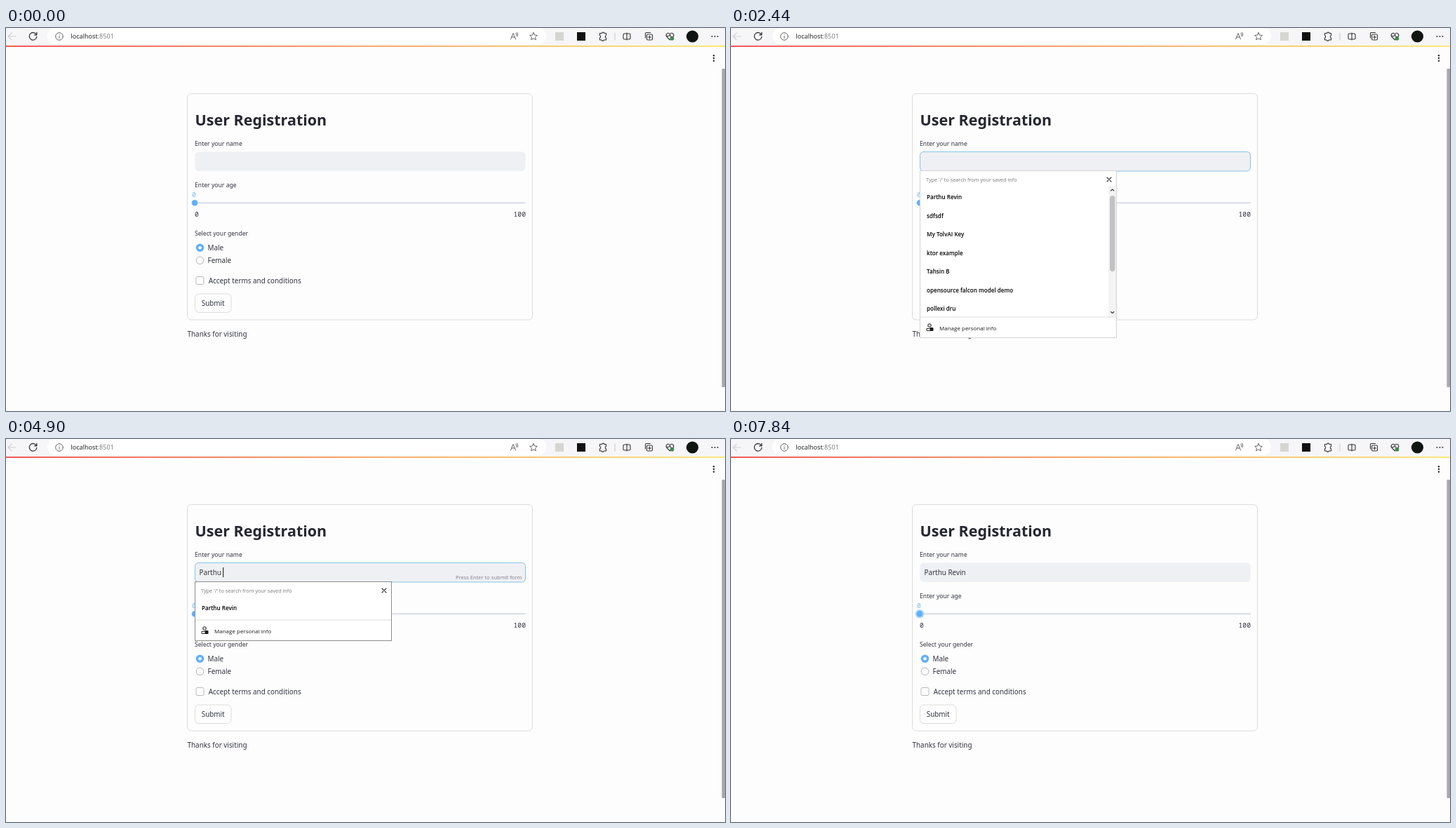
Animation, 1025 px wide and 546 px high, one loop 8 s. Source, as an HTML page:

```html
<!DOCTYPE html>
<html lang="en">
<head>
<meta charset="utf-8">
<title>User Registration</title>
<style>
  html, body { margin: 0; width: 100%; height: 100%; overflow: hidden; background: #fdfdfd; }
  svg { display: block; width: 1025px; height: 546px; }
  text { font: 9.9px "Noto Sans", sans-serif; fill: #31333f; }
  .title { font-size: 21.5px; font-weight: 600; fill: #262730; }
  .label { font-size: 8.65px; }
  .mono { font: 9.7px "Noto Sans Mono", monospace; }
  .hint { font-size: 7.5px; fill: #85868d; }
  .ui { font: 8px "Open Sans", sans-serif; fill: #1b1b1b; }
  .row { font-size: 8.1px; font-weight: 600; fill: #000; }
  .line { fill: none; stroke: #333; stroke-width: 1.1; stroke-linecap: round; stroke-linejoin: round; }
  .edge { fill: #fdfdfd; stroke: #dcdcda; }
</style>
</head>
<body>
<svg viewBox="0 0 1025 546">
  <defs>
    <linearGradient id="stripe">
      <stop offset="0" stop-color="#f4575a"/>
      <stop offset=".5" stop-color="#fba968"/>
      <stop offset="1" stop-color="#fbe97c"/>
    </linearGradient>
  </defs>
  <rect width="1025" height="546" fill="#fdfdfd"/>

  <!-- Browser bar -->
  <rect width="1025" height="25" fill="#f6f6f8"/>
  <rect x="59" y="0" width="711" height="23" rx="11.5" fill="#fff"/>
  <rect y="25" width="1025" height="2" fill="url(#stripe)"/>
  <g class="line">
    <path d="M14 12H3M8 7L3 12L8 17" stroke="#cfcfd2"/>
    <path d="M43.300 9.500A5.300 5.300 0 1 0 43.800 12.500M43.800 6.500V9.800H40.500" stroke-width="1.3"/>
    <g stroke="#666" stroke-width="1"><circle cx="76" cy="12" r="5.300"/><path d="M76 11.500V14.500M76 9.300V9.400"/></g>
    <g stroke="#666" stroke-width="1">
      <path d="M719.500 16L723 7.500L726.500 16M720.800 13H725.200M727 7.500Q728.500 9 727.500 11M728.500 6Q731 9 729 12"/>
      <path d="M752 6.500L753.600 10L757.400 10.400L754.600 13L755.400 16.800L752 14.900L748.600 16.800L749.400 13L746.600 10.400L750.400 10Z"/>
    </g>
    <path d="M846.500 7.500H849.500A1.800 1.800 0 0 1 853 7.500H855.500V10.500A1.900 1.900 0 0 0 855.500 14V17H852.500A1.800 1.800 0 0 1 849 17H846.500V14A1.900 1.900 0 0 0 846.500 10.500Z"/>
    <path d="M868 7V17" stroke="#ccc"/>
    <rect x="880" y="8" width="10" height="8" rx="1.500"/><path d="M885 7V17"/>
    <rect x="913.500" y="9" width="8" height="8" rx="1.500"/><path d="M911.500 14V8Q911.500 6.500 913 6.500H918.500M917.500 11V15M915.500 13H919.500"/>
    <path d="M946.500 17L942 12.500C939.500 9.500 943.500 5 946.500 8.500C949.500 5 953.500 9.500 951 12.500ZM942 11.500H945L946.500 9.500L948 12.500H950"/>
  </g>
  <rect x="783" y="6" width="12" height="12" fill="#d5d5d2"/>
  <rect x="814" y="6" width="12" height="12" fill="#111"/>
  <circle cx="949.500" cy="15" r="2.800" fill="#3d8a4d"/>
  <circle cx="978.500" cy="12" r="8.600" fill="#111512"/>
  <g fill="#333">
    <circle cx="1006.500" cy="12" r="1"/><circle cx="1010.500" cy="12" r="1"/><circle cx="1014.500" cy="12" r="1"/>
    <circle cx="1009" cy="39.300" r="1.250"/><circle cx="1009" cy="43" r="1.250"/><circle cx="1009" cy="46.700" r="1.250"/>
  </g>
  <text class="ui" x="92.500" y="15" style="font-size:9.1px">localhost<tspan fill="#777">:8501</tspan></text>
  <rect x="1020.500" y="58" width="4.500" height="454" rx="1" fill="#a8a8ac"/>

  <!-- Form -->
  <rect class="edge" x="258.500" y="93.500" width="492" height="322.500" rx="5.500"/>
  <text class="title" x="269.500" y="139">User Registration</text>
  <text class="label" x="269" y="168">Enter your name</text>
  <rect id="field" x="269.500" y="176.500" width="471" height="27.500" rx="5" fill="#eff0f4"/>
  <text id="typed" x="275.500" y="194"></text>
  <rect id="caret" y="183" width="1.100" height="14" fill="#222"/>
  <text id="hint" class="hint" x="735.500" y="200" text-anchor="end">Press Enter to submit form</text>

  <text class="label" x="269" y="227">Enter your age</text>
  <rect x="269" y="247.900" width="472" height="2.700" rx="1.300" fill="#e0e2ea"/>
  <circle id="halo" cx="269" cy="249.300" r="6.300" fill="#add8fb"/>
  <circle cx="269" cy="249.300" r="4.300" fill="#60b0f8"/>
  <text class="mono" x="268" y="241" text-anchor="middle" style="fill:#76bdf5">0</text>
  <text class="mono" x="269" y="269">0</text>
  <text class="mono" x="741" y="269" text-anchor="end">100</text>

  <text class="label" x="269" y="296">Select your gender</text>
  <circle cx="276.500" cy="313.300" r="5.700" fill="#60b0f8"/>
  <circle cx="276.500" cy="313.300" r="2.200" fill="#fff"/>
  <text x="287.500" y="317">Male</text>
  <circle cx="276.500" cy="331.300" r="5.300" fill="#fdfdfd" stroke="#b0b1b6"/>
  <text x="287.500" y="335">Female</text>
  <rect x="271" y="354.500" width="11" height="11" rx="1.800" fill="#fdfdfd" stroke="#b8b9bd"/>
  <text x="288.700" y="363.500">Accept terms and conditions</text>
  <rect class="edge" x="269.500" y="379" width="51.500" height="26.500" rx="5.500"/>
  <text x="295.200" y="396" text-anchor="middle">Submit</text>
  <text x="258.500" y="440">Thanks for visiting</text>

  <!-- Saved-info popup -->
  <g id="popup">
    <rect id="panel" x="269.500" y="203.500" width="280" fill="#fff"/>
    <text class="ui" x="278" y="219" style="font-size:7.3px;fill:#777">Type '/' to search from your saved info</text>
    <path class="line" d="M536 213L542 219M542 213L536 219"/>
    <g id="rows"></g>
    <g id="scroll">
      <rect x="538" y="225" width="11" height="186.500" fill="#f4f4f4"/>
      <rect x="540" y="239" width="7.500" height="108" rx="3.700" fill="#c2c2c4"/>
      <path class="line" d="M541.500 232L543.700 230L545.900 232M541.500 404.500L543.700 406.500L545.900 404.500"/>
    </g>
    <g id="footer">
      <path d="M270 0H549" stroke="#dcdcdc"/>
      <g class="line">
        <circle cx="283" cy="12" r="2.200"/>
        <path d="M284 19.500H280Q279 19.500 279 18.500V16.500H284"/>
      </g>
      <rect x="283.500" y="15" width="5" height="5" rx="1" fill="#1b1b1b"/>
      <text class="ui" x="297" y="18.500">Manage personal info</text>
    </g>
  </g>
</svg>
<script>
const LOOP = 8000, FOCUS = 1840, OPEN = 2040, BLUR = 6740, HALO = 7000;
const NAME = 'Parthu Revin';
const SAVED = [NAME, 'sdfsdf', 'My TolvAI Key', 'ktor example', 'Tahsin B',
  'opensource falcon model demo', 'pollexi dru'];

// [time, letters typed so far]
const KEYS = [[2840, 1], [3240, 3], [3640, 5], [4040, 6], [4840, 7],
  [5200, 8], [5640, 9], [6070, 11], [6340, 12]];

const $ = id => document.getElementById(id);
const show = (id, on) => $(id).setAttribute('visibility', on ? 'inherit' : 'hidden');
const set = (id, attrs) => {
  for (const key in attrs) $(id).setAttribute(key, attrs[key]);
};

const rows = SAVED.map((label, i) => {
  const row = document.createElementNS('http://www.w3.org/2000/svg', 'text');
  row.setAttribute('class', 'ui row');
  row.setAttribute('x', 279);
  row.textContent = label;
  return $('rows').appendChild(row);
});

function layoutPopup(prefix) {
  let count = 0;
  rows.forEach((row, i) => {
    const match = SAVED[i].toLowerCase().startsWith(prefix.toLowerCase());
    row.style.display = match ? '' : 'none';
    if (match) row.setAttribute('y', 244 + 26.55 * count++);
  });
  const full = !prefix;
  const divider = full ? 412 : 231.5 + 26.5 * count;
  set('panel', { height: divider + 30 - 204, stroke: full ? '#d2d2d2' : '#8c8c8c' });
  set('footer', { transform: `translate(0 ${divider})` });
  show('scroll', full);
}

function draw(t) {
  const [lastKey, length] = KEYS.filter(([at]) => at <= t).pop() || [FOCUS, 0];
  const text = NAME.slice(0, length);
  const focused = t >= FOCUS && t < BLUR;
  $('typed').textContent = text.replace(/ /g, '\u00a0');
  set('field', { stroke: focused ? '#87c3e6' : 'none' });
  show('hint', focused && length > 0);
  show('caret', focused && (t - lastKey) % 1000 < 500);
  set('caret', { x: 275.2 + (text ? $('typed').getComputedTextLength() : 0) });
  show('popup', t >= OPEN && t < BLUR);
  layoutPopup(text);
  show('halo', t >= HALO);
}

function tick() {
  draw(performance.now() % LOOP);
  requestAnimationFrame(tick);
}
tick();
</script>
</body>
</html>
```
